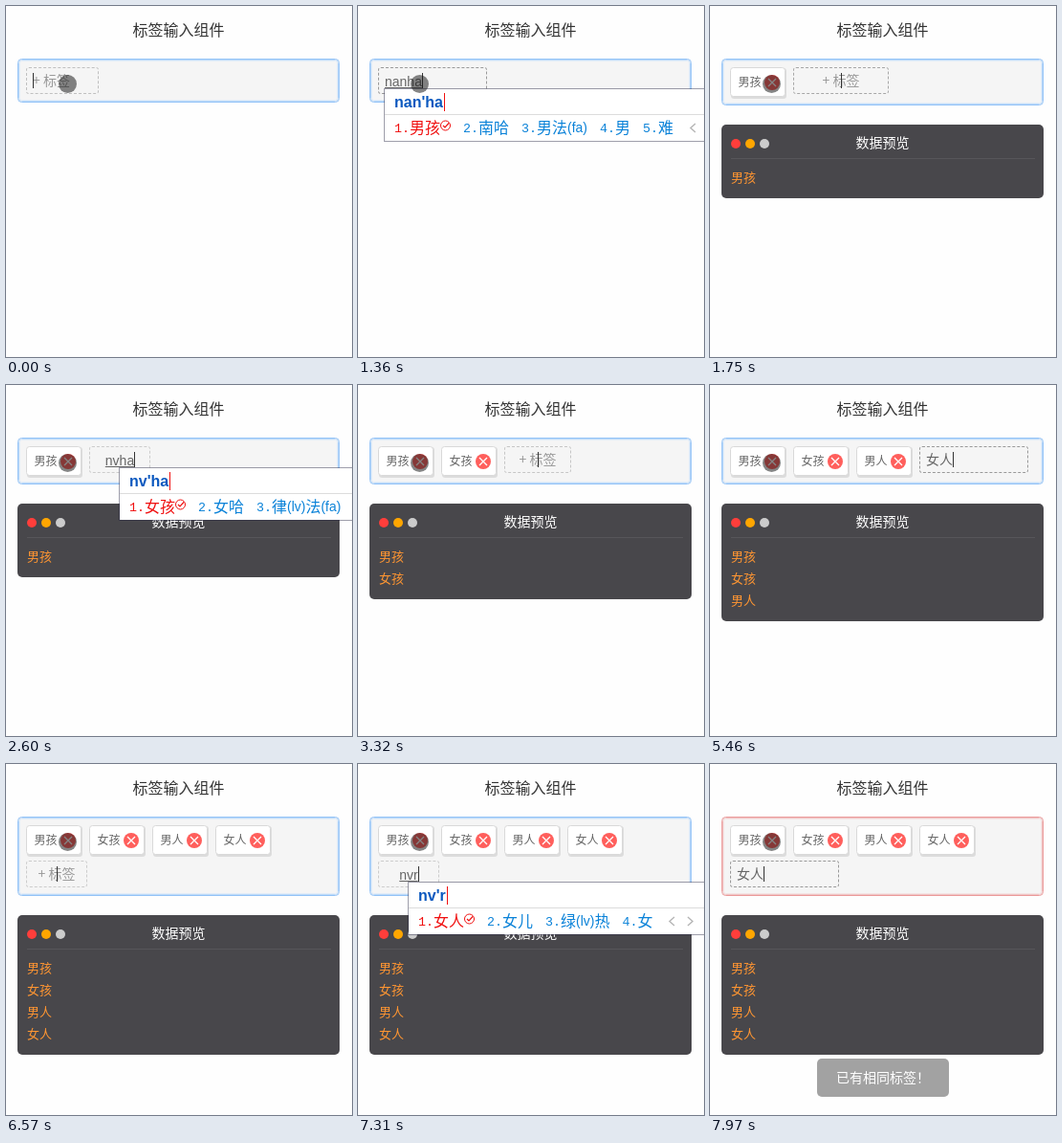
An HTML page for the animation above (8000 ms loop, 362 by 367 pixels).

```html
<!DOCTYPE html>
<html lang="zh-CN">
<head>
<meta charset="utf-8">
<title>标签输入组件</title>
<style>
html, body { margin: 0; width: 100%; height: 100%; overflow: hidden; background: #fefefe; }
svg { display: block; width: 362px; height: 367px; font-family: "Noto Sans CJK SC", "Noto Sans CJK", sans-serif; }
.latin { font-family: "Liberation Sans", Arial, sans-serif; }
.num { font: 13.33px "Liberation Mono", monospace; }
.field { box-sizing: border-box; height: 28px; border: 1px dashed; border-radius: 3px; }
</style>
</head>
<body>
<svg id="stage" viewBox="0 0 362 367"></svg>
<script>
const LOOP = 8000;
const TAGS = ['男孩', '女孩', '男人', '女人'];

// Suggestions for each composition.
const WORDS = {
  "n": '你 那 年 呢 女',
  "na": '那 拿 哪 呐 纳',
  "nan": '男 难 南 楠 喃',
  "nan'h": '男孩 南海 难喝 男 难',
  "nan'ha": '男孩 南哈 男法(fa) 男 难',
  "nan'hai": '男孩 南海 男 难 南',
  "nan'ren": '男人 难忍 男 难 南',
  "nv": '女 律(lv) 绿(lv) 旅(lv) 虑(lv)',
  "nv'h": '女孩 女号 律(lv)后 女',
  "nv'ha": '女孩 女哈 律(lv)法(fa) 女',
  "nv'hai": '女孩 女海 女 律(lv)',
  "nv'r": '女人 女儿 绿(lv)热 女',
  "nv're": '女人 女热 绿(lv)热 女',
  "nv'ren": '女人 绿(lv)人 旅(lv)人 女'
};

// time, tag count, field width, text, state
const STEPS = [
  [0, 0, 76, ''], [150, 0, 98, ''], [285, 0, 110, ''], [420, 0, 114, ''],
  [850, 0, 114, "n"], [980, 0, 114, "na"], [1110, 0, 114, "nan"],
  [1240, 0, 114, "nan'h"], [1360, 0, 114, "nan'ha"], [1510, 0, 114, "nan'hai"],
  [1630, 0, 114, '男孩'], [1750, 1, 100, ''], [1870, 1, 76, ''],
  [2020, 1, 64, "n"], [2170, 1, 64, "nv"], [2320, 1, 64, "nv'h"],
  [2600, 1, 64, "nv'ha"], [2740, 1, 64, "nv'hai"],
  [2880, 1, 80, '女孩'], [3020, 1, 110, '女孩'], [3160, 2, 100, ''], [3310, 2, 70, ''],
  [3450, 2, 64, "n"], [3590, 2, 64, "nan"], [3710, 2, 64, "nan'ren"],
  [3850, 2, 74, '男人'], [3990, 2, 104, '男人'], [4130, 2, 114, '男人'],
  [4270, 3, 100, ''], [4400, 3, 76, ''], [4540, 3, 64, ''],
  [4670, 3, 64, "n"], [4950, 3, 64, "nv'r"], [5080, 3, 64, "nv'ren"],
  [5210, 3, 74, '女人'], [5330, 3, 104, '女人'], [5460, 3, 114, '女人'],
  [5600, 4, 90, ''], [5730, 4, 64, ''], [6010, 4, 64, '', 'blink'], [6570, 4, 64, ''],
  [6850, 4, 64, "n"], [7000, 4, 64, "nv"], [7310, 4, 64, "nv'r"],
  [7440, 4, 64, "nv're"], [7570, 4, 64, "nv'ren"],
  [7700, 4, 80, '女人'], [7830, 4, 108, '女人'], [7970, 4, 114, '女人', 'error']
];

const stage = document.getElementById('stage');
const pen = document.createElement('canvas').getContext('2d');

function measure(s, font) {
  pen.font = font + ' "Liberation Sans", Arial, sans-serif';
  return pen.measureText(s).width;
}

const rect = (x, y, w, h, fill, more = '') =>
  `<rect x="${x}" y="${y}" width="${w}" height="${h}" fill="${fill}" ${more}/>`;

// One-pixel outline lying inside the given box.
const frame = (x, y, w, h, fill, stroke, r = 0) =>
  rect(x + .5, y + .5, w - 1, h - 1, fill, `stroke="${stroke}" rx="${r}"`);

const text = (s, x, y, size, fill, more = '') =>
  `<text x="${x}" y="${y}" font-size="${size}" fill="${fill}" ${more}>${s}</text>`;

const dot = (x, y, r, fill) => `<circle cx="${x}" cy="${y}" r="${r}" fill="${fill}"/>`;
const line = (d, stroke, w = 1) => `<path d="${d}" fill="none" stroke="${stroke}" stroke-width="${w}"/>`;
const MIDDLE = 'text-anchor="middle"';

function box(h, error) {
  const [a, b, c] = error ? ['#eb9a9a', '#f0c6c6', '#f4e4e4'] : ['#93c3f7', '#bedaf8', '#e2edf8'];
  return frame(12, 55, 337, h, '#f5f5f5', a, 4) +
    frame(13, 56, 335, h - 2, 'none', b, 3) +
    frame(14, 57, 333, h - 4, 'none', c, 2);
}

function tag(name, i) {
  const x = 21 + 66 * i, cx = x + 44;
  return rect(x + 1, 65, 58, 32, '#000', 'rx="3" opacity=".1"') +
    frame(x, 64, 58, 31, '#fff', '#d9d9d9', 3) +
    text(name, x + 8.5, 84, 12, '#666') +
    dot(cx, 80, 8, '#ff5f5c') +
    line(`M${cx - 4} 76l8 8m0 -8l-8 8`, '#fff', 1.3);
}

function panel(names, y) {
  return rect(12, y, 337, 54 + 23 * names.length, '#48474b', 'rx="5"') +
    dot(27, y + 20, 5, '#ff3e3b') + dot(42, y + 20, 5, '#ffa600') + dot(57, y + 20, 5, '#ccc') +
    text('数据预览', 180.5, y + 24, 14, '#fff', MIDDLE + ' font-weight="500"') +
    line(`M22 ${y + 35.5}H340`, '#57565a') +
    names.map((s, i) => text(s, 22, y + 60 + 23 * i, 13, '#ff9632')).join('');
}

function field(x, y, w, value, composing, left, caret) {
  const shade = Math.round(204 - 51 * (w - 64) / 50);
  const mid = x + w / 2, base = y + 19;
  let out = `<foreignObject x="${x}" y="${y}" width="${w}" height="28">` +
    `<div class="field" style="border-color:rgb(${shade},${shade},${shade})"></div></foreignObject>`;
  let end = left ? x + 7 : Math.round(mid);
  if (!value) {
    out += text('+ 标签', left ? x + 7 : mid, base, 14, '#999', left ? '' : MIDDLE);
  } else if (composing) {
    const s = value.replace("'", ''), wide = measure(s, '14px');
    const from = left ? x + 7 : mid - wide / 2;
    out += text(s, from, base + 1, 14, '#666', 'class="latin"') +
      line(`M${from} ${y + 21.5}h${wide}`, '#666');
    end = Math.round(from + wide);
  } else {
    out += text(value, x + 7, base, 14, '#666');
    end = x + 7 + 14 * value.length;
  }
  return out + (caret ? rect(end, y + 6, 1, 16, '#333') : '');
}

function popup(x, y, key) {
  const row = y + 47, wide = measure(key, 'bold 16px');
  let px = x + 11, out = '';
  WORDS[key].split(' ').forEach((word, i) => {
    const color = i ? '#0a82d8' : '#f01010';
    out += text(i + 1 + '.', px, row - 1.5, 13.33, color, 'class="num"');
    px += 16;
    for (const part of word.match(/\([a-z]+\)|./g)) {
      const latin = part.length > 1;
      out += latin ? text(part, px, row - 1, 14, color, 'class="latin"') : text(part, px, row, 16, color);
      px += latin ? measure(part, '14px') : 16;
    }
    if (!i) {
      out += `<circle cx="${px + 5.5}" cy="${y + 39}" r="5" fill="none" stroke="${color}"/>` +
        line(`M${px + 3} ${y + 39}l2 2 4 -4.5`, color, 1.2);
      px += 11;
    }
    px += 13;
  });
  const end = Math.round(px - 13);
  return rect(x + 1, y + 1, end + 55 - x, 54, '#fff') +
    frame(x, y, end + 57 - x, 56, 'none', 'rgba(40,40,70,.45)') +
    line(`M${x + 1} ${y + 27.5}H${end + 56}`, '#dcdcdc') +
    text(key, x + 11, y + 20, 16, '#0a58bf', 'class="latin" font-weight="bold"') +
    rect(Math.round(x + 12 + wide), y + 5, 1, 19, '#f01010') + out +
    line(`M${end + 23} ${y + 37}l-5 4.5 5 4.5`, '#b5b5b5', 1.4) +
    line(`M${end + 37} ${y + 37}l5 4.5 -5 4.5`, '#b5b5b5', 1.4);
}

function draw([, count, width, value, state]) {
  const names = TAGS.slice(0, count);
  const wrapped = count > 3;
  const x = wrapped ? 21 : 21 + 66 * count, y = wrapped ? 101 : 64;
  const height = wrapped ? 83 : count ? 49 : 46;
  const composing = value in WORDS;
  const left = !count || (value && !composing);

  stage.innerHTML =
    text('标签输入组件', 180.5, 31, 16, '#333', MIDDLE) +
    box(height, state === 'error') +
    names.map(tag).join('') +
    field(x, y, width, value, composing, left, state !== 'blink') +
    (count ? panel(names, 75 + height) : '') +
    (composing ? popup(x + (left ? 6 : 31), y + 22, value) : '') +
    dot(64.5, 81.5, 9.5, 'rgba(22,22,22,.52)') +
    (state === 'error'
      ? rect(112, 308, 138, 40, '#a2a2a2', 'rx="5"') +
        text('已有相同标签！', 132, 333, 14, '#fff', 'font-weight="500"')
      : '');
}

let shown = null;
function tick() {
  const t = performance.now() % LOOP;
  const step = STEPS.findLast(s => s[0] <= t);
  if (step !== shown) draw(shown = step);
  requestAnimationFrame(tick);
}
tick();
</script>
</body>
</html>
```
